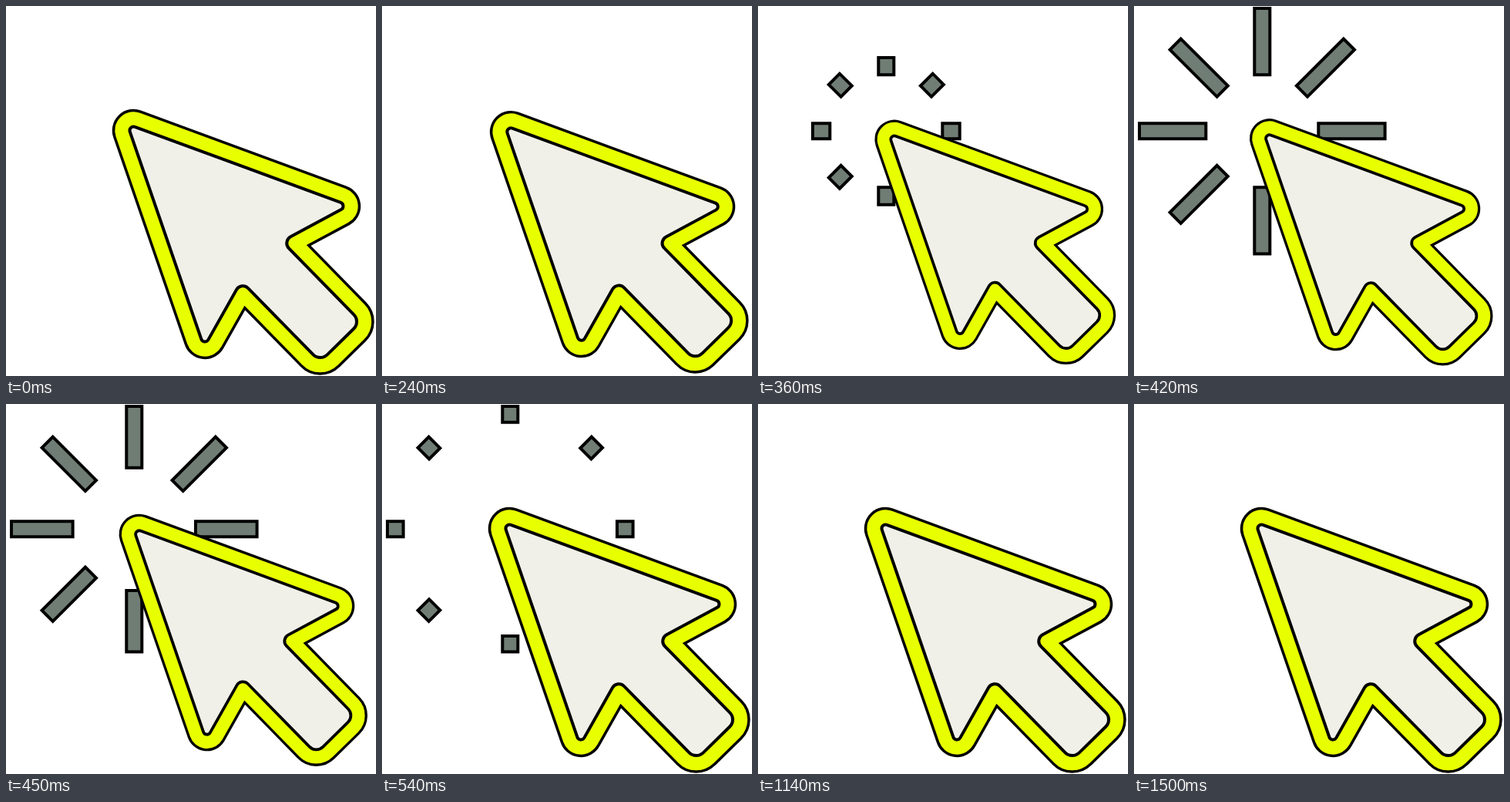
Write an HTML page with a canvas that moves like this. It is 480x480 px and loops after 1.53 s.

```html
<!DOCTYPE html>
<html lang="en">
<head>
<meta charset="utf-8">
<title>Cursor click</title>
<style>
  html, body { margin: 0; width: 100%; height: 100%; overflow: hidden; background: #fff; }
  canvas { display: block; width: 480px; height: 480px; }
</style>
</head>
<body>
<canvas id="stage" width="480" height="480"></canvas>
<script>
const ctx = document.getElementById('stage').getContext('2d');
const LOOP = 1530, STEP = 30;
const BLACK = '#000', LIME = '#e8ff00', PAPER = '#f0f0e9', SLATE = '#707d74';

// Half of the arrow outline, tip at the origin, pointing along -x: x, y, corner radius
const half = [[264.8, 131.3, 5], [237.5, 37, 9.5], [383.6, 37, 13]];
const corners = [
  [-11.66, 0, 5],
  ...half,
  ...half.slice().reverse().map(([x, y, r]) => [x, -y, r])
];

const arrow = new Path2D();
arrow.moveTo(120, -62.54);
corners.forEach(([x, y, r], i) => {
  const [nx, ny] = corners[(i + 1) % corners.length];
  arrow.arcTo(x, y, nx, ny, r);
});
arrow.closePath();

function ease(t, from, to) {
  const p = Math.min(1, Math.max(0, (t - from) / (to - from)));
  return p * p * (3 - 2 * p);
}

function outline(width, color) {
  ctx.lineWidth = width;
  ctx.strokeStyle = color;
  ctx.stroke(arrow);
}

function drawArrow(t) {
  const scale = 1 - 0.08 * (ease(t, 210, 330) - ease(t, 390, 540));
  ctx.save();
  ctx.translate(308, 306.5);
  ctx.scale(scale, scale);
  ctx.translate(165.5 - 308, 161.5 - 306.5);
  ctx.rotate(45.6 * Math.PI / 180);
  ctx.lineJoin = 'round';
  outline(45.5, BLACK);
  outline(38.5, LIME);
  ctx.fillStyle = PAPER;
  ctx.fill(arrow);
  outline(4, BLACK);
  ctx.restore();
}

// Rays grow outwards, then their inner ends catch up
function drawRays(t) {
  const start = 73, length = 86.3;
  const inner = start + length * ease(t, 420, 596);
  const outer = start + length * ease(t, 330, 420);
  if (outer - inner < 0.5) return;
  ctx.save();
  ctx.translate(166.3, 162.3);
  ctx.lineJoin = 'miter';
  ctx.lineWidth = 4;
  ctx.strokeStyle = BLACK;
  ctx.fillStyle = SLATE;
  for (let i = 0; i < 8; i++) {
    ctx.beginPath();
    ctx.rect(inner, -10, outer - inner, 20);
    ctx.fill();
    ctx.stroke();
    ctx.rotate(Math.PI / 4);
  }
  ctx.restore();
}

function draw(t) {
  ctx.fillStyle = '#fff';
  ctx.fillRect(0, 0, 480, 480);
  drawRays(t);
  drawArrow(t);
}

const start = performance.now();
function tick() {
  const t = (performance.now() - start) % LOOP;
  draw(Math.floor(t / STEP) * STEP);
  requestAnimationFrame(tick);
}
tick();
</script>
</body>
</html>
```
